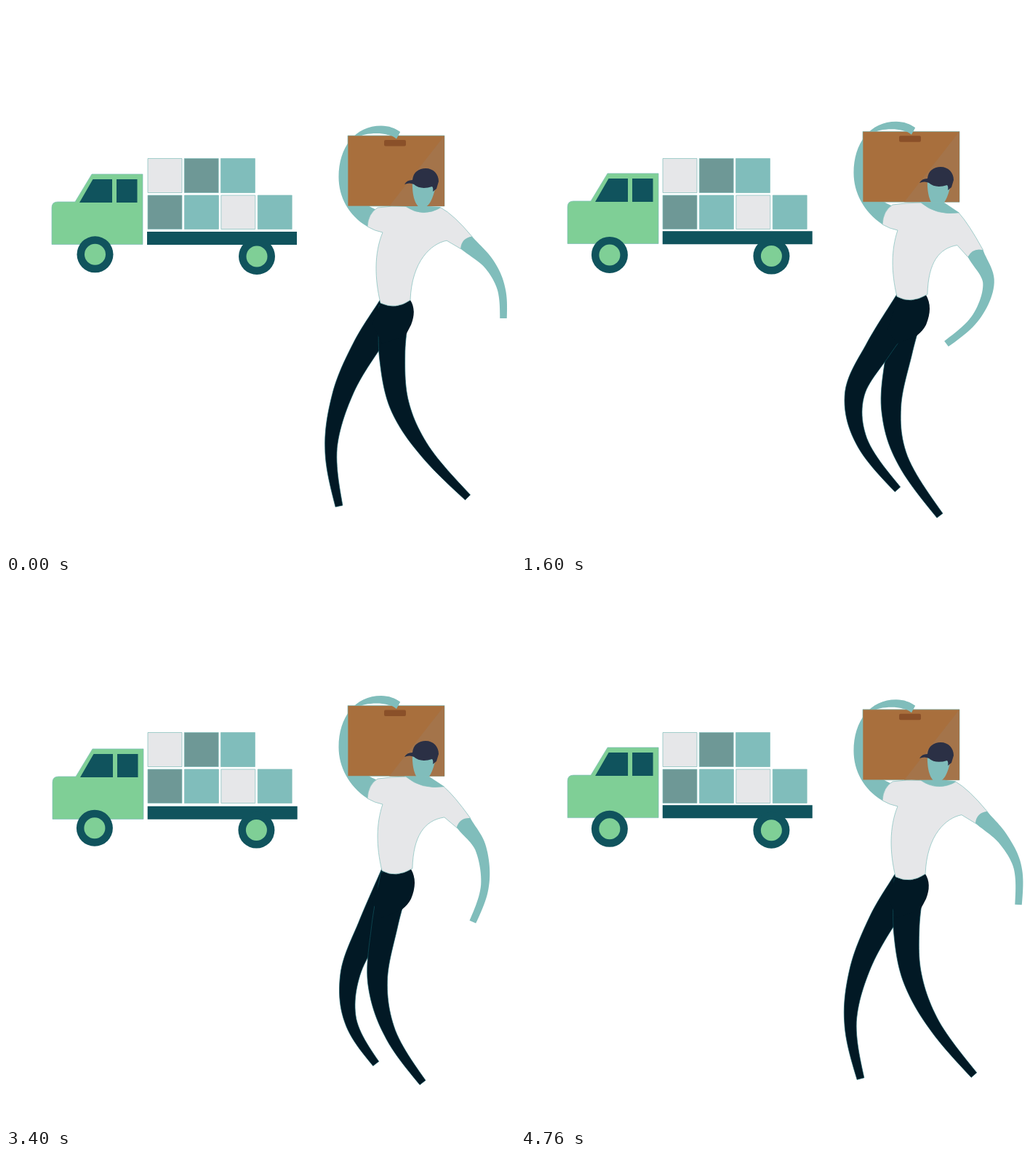
These frames come from a looping animation (700x750 px, 4800 ms). An HTML page with a canvas:

```html
<!DOCTYPE html>
<html lang="en">
<head>
<meta charset="utf-8">
<title>Delivery</title>
<style>
html, body { margin: 0; width: 100%; height: 100%; overflow: hidden; background: #fff; }
canvas { display: block; width: 700px; height: 750px; }
</style>
</head>
<body>
<canvas id="stage" width="700" height="750"></canvas>
<script>
const ctx = document.getElementById('stage').getContext('2d');
const LOOP = 4800, STEP = 40, WALK = 1196;
const SKIN = '#80bdbb', SHIRT = '#e6e7e9', PANTS = '#021925', DARK = '#10535d',
      GREEN = '#7fcf96', SLATE = '#6e9896', BROWN = '#a86f3d';

// Limb poses: time, then points along the limb.
const legA = [
  [0, 495,468, 463,532, 447,607, 458,687],
  [210, 510,478, 488,548, 487,624, 522,701],
  [404, 520,476, 509,552, 524,622, 576,700],
  [532, 526,480, 529,548, 558,612, 626,685],
  [598, 531,480, 541,548, 575,610, 636,674],
  [800, 516,478, 503,546, 533,604, 590,650],
  [1000, 504,472, 475,540, 476,605, 512,664],
  [1044, 500,473, 468,540, 465,605, 495,666],
  [1172, 497,467, 466,534, 453,607, 467,685]
];
const legB = [
  [0, 531,480, 541,548, 575,610, 635,675],
  [205, 513,477, 494,542, 524,602, 590,650],
  [404, 492,470, 459,532, 468,597, 518,664],
  [532, 495,464, 462,528, 456,604, 482,678],
  [598, 495,468, 463,532, 447,607, 458,687],
  [805, 510,476, 489,546, 489,618, 518,692],
  [1000, 520,476, 510,552, 526,622, 571,690],
  [1044, 523,476, 516,548, 538,620, 582,693],
  [1172, 530,480, 538,546, 568,611, 623,680]
];
const freeArm = [
  [0, 633,325, 664,354, 681,388, 684,429],
  [200, 629,334, 653,370, 657,420, 640,469],
  [404, 625,340, 643,380, 626,427, 585,464],
  [532, 624,343, 636,386, 609,427, 554,450],
  [612, 623,343, 633,388, 602,427, 543,444],
  [800, 625,340, 642,381, 624,427, 580,463],
  [1000, 629,334, 652,369, 657,420, 639,469.5],
  [1044, 630,331, 658,367, 667,415, 656,467.5],
  [1172, 633,326, 663,356, 683,395, 684,446]
];
// Truck shake, one value every 200 ms
const shakeX = [0,1,-.5,.5,-1,-1,0,1,1,0,-.5,0,.5,-1,.5,0,-1,1,0,1,1,1,-1,.5,1.2];
const shakeY = [0,1,-1,0,1,-1,0,1,-1,0,1,1,-.5,.5,-1,0,1,1,0,-1,0,0,1,-.5,-1];

const lerp = (a, b, u) => a + (b - a) * u;
const smooth = u => (1 - Math.cos(Math.PI * u)) / 2;

function hermite(a, b, ta, tb, u) {
  const v = u * u, w = v * u;
  return (2 * w - 3 * v + 1) * a + (w - 2 * v + u) * ta + (3 * v - 2 * w) * b + (w - v) * tb;
}

function sample(list, t) {
  const i = Math.min(Math.floor(t / 200), list.length - 2);
  return lerp(list[i], list[i + 1], t / 200 - i);
}

// Smooth periodic interpolation between poses, returned as [x, y] pairs
function pose(keys, t) {
  const n = keys.length;
  const at = i => keys[(i + n) % n];
  const time = i => at(i)[0] + Math.floor(i / n) * WALK;
  let i = n - 1;
  while (keys[i][0] > t) i--;
  const span = time(i + 1) - time(i), u = (t - time(i)) / span;
  const slope = (j, c) => (at(j + 1)[c] - at(j - 1)[c]) / (time(j + 1) - time(j - 1)) * span;
  const points = [];
  for (let c = 1; c < keys[0].length; c += 2) {
    points.push([c, c + 1].map(d => hermite(at(i)[d], at(i + 1)[d], slope(i, d), slope(i + 1, d), u)));
  }
  return points;
}

// Outline of a tapered limb: both edges along a spline
function limb(points, widths) {
  const n = points.length - 1;
  const tan = points.map((p, i) => [0, 1].map(c =>
    i === 0 ? points[1][c] - p[c] :
    i < n ? (points[i + 1][c] - points[i - 1][c]) / 2 :
    1.5 * (p[c] - points[n - 1][c]) - (p[c] - points[n - 2][c]) / 4));
  const left = [], right = [];
  let prev;
  for (let s = 0; s <= n * 12; s++) {
    const i = Math.min(Math.floor(s / 12), n - 1), u = s / 12 - i;
    const [x, y] = [0, 1].map(c => hermite(points[i][c], points[i + 1][c], tan[i][c], tan[i + 1][c], u));
    let dx, dy;
    if (s === 0) [dx, dy] = tan[0];
    else if (s === n * 12) [dx, dy] = tan[n];
    else {
      const e = .01, [fx, fy] = [0, 1].map(c =>
        hermite(points[i][c], points[i + 1][c], tan[i][c], tan[i + 1][c], u + e));
      dx = fx - x; dy = fy - y;
    }
    const h = lerp(widths[i], widths[i + 1], u) / 2 / Math.hypot(dx, dy);
    left.push([x + dy * h, y - dx * h]);
    right.push([x - dy * h, y + dx * h]);
  }
  return { left, right, tan };
}

function fill(path, color, edge) {
  const p = new Path2D(path);
  ctx.fillStyle = color;
  ctx.fill(p);
  if (edge) {
    ctx.strokeStyle = edge;
    ctx.lineWidth = .7;
    ctx.stroke(p);
  }
}

const rect = (x, y, w, h) => `M${x},${y}h${w}v${h}h${-w}Z`;

function shifted(x, y, draw) {
  ctx.save();
  ctx.translate(x, y);
  draw();
  ctx.restore();
}

function wheel(x, y) {
  for (const [r, color] of [[25, DARK], [14.5, GREEN]]) {
    ctx.fillStyle = color;
    ctx.beginPath();
    ctx.arc(x, y, r, 0, 7);
    ctx.fill();
  }
}

function drawTruck(t) {
  const dx = sample(shakeX, t), dy = sample(shakeY, t);
  [SHIRT, SLATE, SKIN].forEach((c, i) => fill(rect(195 + i * 50.2, 209.5, 47, 47), c, SKIN));
  [SLATE, SKIN, SHIRT, SKIN].forEach((c, i) => fill(rect(195 + i * 50.4, 260, 47, 46.5), c, SKIN));
  shifted(dx, dy, () => {
    fill('M63,327.5V277Q63,269 71,269H95L118,231H188V327.5Z', GREEN, SKIN);
    fill('M101,270L119.5,238H146V270Z' + rect(152, 238, 28.5, 32), DARK);
  });
  shifted(dx * .7, dy * .7, () => fill(rect(194, 310, 206, 18), DARK));
  wheel(122.5 - dx * .6, 341.3 - dy * .6);
  wheel(345 - dx * .6, 344 - Math.abs(dy) * .4);
}

function drawMan(t) {
  const u = t % (WALK / 2);
  const k = u < 390 ? 1 - smooth(u / 390) : smooth((u - 390) / (WALK / 2 - 390));
  const m = (low, high) => lerp(high, low, k);
  const lift = m(0, -5.7);

  // Carrying arm and parcel
  shifted(0, lift, () => {
    const end = 303 + m(0, 2.7);
    fill(`M497,${end}C471,288 457.5,262 457.5,235C457.5,194 480,164.5 516,164.5C527,164.5 535,168 542,173
      L537,182C530,177 520,175 510,175C498,175 488,177 484,181C474,195 473,220 473,240C474,262 495,275 520,284Z`, SKIN);
    fill(rect(470, 178, 133, 97), BROWN, SKIN);
    fill('M603,178V275H527Z', '#a4744a');
    fill('M522,184H548Q550,184 550,186V190.5Q550,192.5 548,192.5H522Q520,192.5 520,190.5V186Q520,184 522,184Z', '#8a5029');
    fill('M526,166.5Q535,168 542,173L537,182.5Q531,177.5 524,176.5Z', SKIN);
  });

  // Head
  shifted(0, m(0, -2), () => {
    fill('M559,240C558,260 563,277 572,277.5C583,277 588,262 591,246L587,238Z', SKIN);
    fill(`M548,245Q551,239 559,239C560,228 568,223 577,223C588,223 595,231 595,241
      L592,251L587,255Q588,250 586,248Q570,253 561,245Q555,242 548,245Z`, '#2b3045');
  });
  fill(`M548,${m(275, 269)}L582,${m(275, 270)}L${m(598, 603)},${m(276, 284)}Q575,300 548,${m(275, 269)}Z`, SKIN);

  // Legs
  const hip = [m(534, 536), m(412, 405)];
  for (const keys of [legA, legB]) {
    const { left, right } = limb([hip, ...pose(keys, t)], [42, 35.5, 27, 16.5, 10]);
    fill('M' + left.concat(right.reverse()).join('L') + 'Z', PANTS, DARK);
  }
  fill(`M${m(515, 519)},${m(409, 401)}L${m(556, 557)},${m(404, 397)}Q${m(565, 567)},${m(418, 414)} 557,438
    Q553,446 ${m(549, 544)},453L517,464L504,${m(436, 444)}Z`, PANTS);

  // Shirt and free arm
  const arm = pose(freeArm, t);
  const { left, right, tan } = limb(arm, [23, 15.5, 11, 9.5]);
  const outer = left[0], inner = right[0];
  const neckY = m(277, 284);
  const pitX = 606 + (inner[0] - 625) * .58, pitY = 322 + (inner[1] - 333) * .56;
  fill(`M497,${m(303, 300)}Q498,${m(285, 281)} 511,${m(277, 273)}Q530,${m(274, 270)} 550,${m(275.5, 270)}
    Q${m(573, 571)},${m(291, 288)} ${m(598, 602)},${neckY}
    Q616,${(neckY + outer[1]) / 2 - 10} ${outer}L${inner}L${pitX},${pitY}
    C${m(585, 575)},${pitY + 4} ${m(558, 560)},${m(350, 352)} ${m(556, 559)},${m(404, 396)}
    Q536,${m(418, 410)} ${m(515, 517)},${m(408, 399)}
    C${m(507, 509)},${m(375, 365)} ${m(506, 509)},${m(340, 335)} 518,${m(311, 308)}
    Q507,${m(309, 306)} 497,${m(303, 300)}Z`, SHIRT, SKIN);
  const len = Math.hypot(...tan[0]);
  const cuff = [0, 1].map(c => arm[0][c] - tan[0][c] / len * 9);
  fill(`M${left.join('L')}L${right.reverse().join('L')}Q${cuff} ${outer}Z`, SKIN);
}

function frame() {
  const t = Math.floor(performance.now() % LOOP / STEP) * STEP;
  ctx.fillStyle = '#fff';
  ctx.fillRect(0, 0, 700, 750);
  drawTruck(t);
  drawMan(t % WALK);
  requestAnimationFrame(frame);
}
frame();
</script>
</body>
</html>
```
